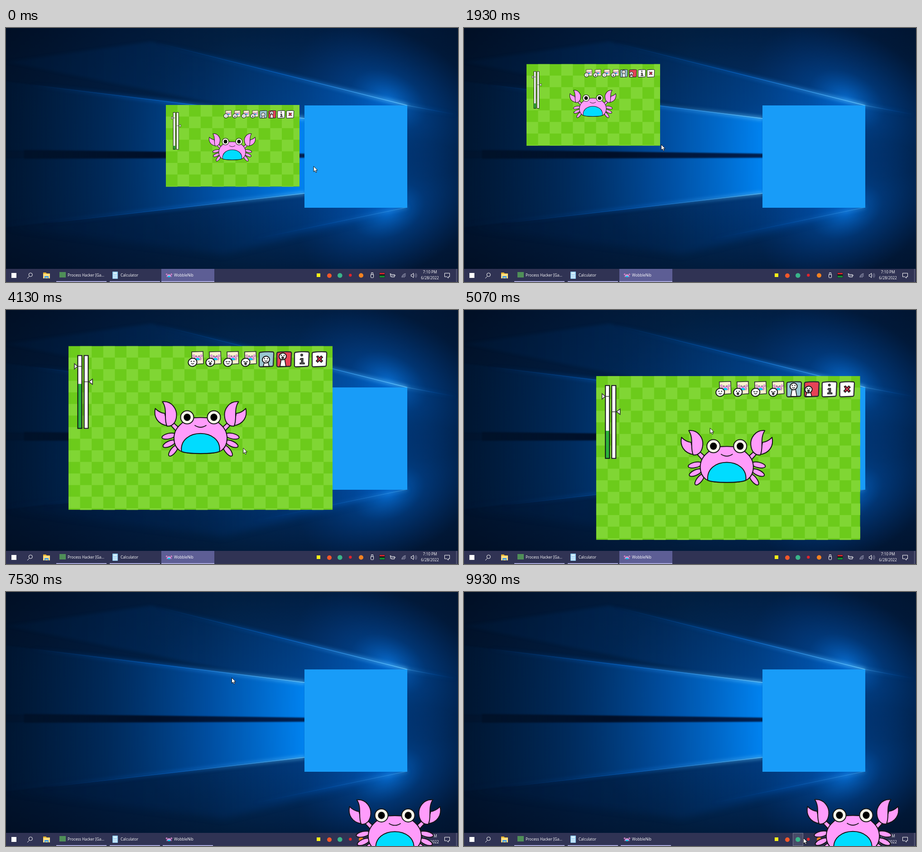
Animation of 998 by 561 pixels, one loop 10 s. Source, as an HTML page with a canvas:

```html
<!DOCTYPE html>
<html lang="en">
<head>
<meta charset="utf-8">
<title>Desktop crab</title>
<style>
html, body { margin: 0; width: 100%; height: 100%; overflow: hidden; background: #011025; }
canvas, svg, .bar { position: absolute; left: 0; top: 0; }
.bar { top: 532px; width: 998px; height: 29px; background: #303354; }
.bar span { position: absolute; top: 8px; font: 8.3px/12px "Open Sans", "Noto Sans", sans-serif; color: #fff; white-space: nowrap; }
.bar .clock { left: 911px; width: 50px; text-align: center; }
.task { position: absolute; top: 0; height: 29px; box-sizing: border-box; border-bottom: 2px solid #aaa9dc; }
.task.on { background: #5d5e95; left: 343px !important; width: 117px !important; }
#hover { position: absolute; left: 726px; top: 0; width: 21px; height: 27px; border: 1px solid #777990; background: #474a68; }
</style>
</head>
<body>
<canvas id="wall" width="998" height="561"></canvas>
<div class="bar">
  <div class="task" style="left:111px;width:111px"></div>
  <div class="task" style="left:229px;width:111px"></div>
  <div class="task" id="app" style="left:346px;width:111px"></div>
  <div id="hover"></div>
  <span style="left:136px">Process Hacker [Ga...</span>
  <span style="left:253px">Calculator</span>
  <span style="left:371px">WobbleNib</span>
  <span class="clock" style="top:1px">7:10 PM</span>
  <span class="clock" style="top:14px">6/28/2022</span>
</div>
<svg width="998" height="561" fill="none" stroke="#fff">
  <rect x="12" y="541" width="11" height="11" fill="#fff" stroke="none"/>
  <path d="M51.5 548.5L47 553"/><circle cx="54.3" cy="545" r="4"/>
  <g stroke="none">
    <path d="M82 540h6l2 2h7v11H82z" fill="#e9b52e"/><path d="M82 543h15v10H82z" fill="#ffdf80"/>
    <path d="M85 553v-5h9v5h-2v-2h-5v2z" fill="#3d9be8"/>
    <rect x="118" y="539" width="14" height="12" fill="#4f8f58"/>
    <rect x="235" y="538" width="12" height="16" rx="1" fill="#8ecbf2"/>
    <path d="M237 540h8v3h-8z" fill="#e8f6ff"/>
    <path d="M237 545.5h8m-8 3h8m-8 3h8" stroke="#fff" stroke-width="1.8" stroke-dasharray="2 1"/>
    <rect x="686" y="542" width="8" height="8" fill="#f7f019"/>
    <circle cx="714" cy="547" r="5" fill="#f4582a"/>
    <circle cx="737.3" cy="546.5" r="5.3" fill="#39b58a"/>
    <circle cx="760.3" cy="546" r="3.2" fill="#e3232c"/>
    <circle cx="784" cy="546.5" r="5" fill="#f58220"/>
    <path d="M824.5 540.5h12v11h-12z" fill="#171717"/>
    <path d="M825 541h11v3h-11z" fill="#d62431"/><path d="M825 547h11v4h-11z" fill="#118a35"/>
  </g>
  <path d="M805.5 544.5h6v6q0 1-1 1h-4q-1 0-1-1zm1.300 0v-4h3.500v4M849 542.500v7m0-5h8.500v5.500h-6.500v-3.500m8-1.500v3M847.500 543h3M853 547h3"/>
  <path d="M874 551a9 9 0 0 1 8.500-8.500M876.500 551a6 6 0 0 1 6-6M879 551a4 4 0 0 1 3.500-3.500" stroke="#c6c8dc"/>
  <path d="M894.500 544.500h2l3-3v10l-3-3h-2z"/><path d="M901 544.500q2 2 0 4m2-6q3 4 0 8m2-9q4 5 0 10" stroke="#a6a8bf" stroke-width=".8"/>
  <path d="M968.500 541.500h11v8h-3v3l-3-3h-5z"/>
  <path d="M994.500 532v29" stroke="#75778e"/>
</svg>
<canvas id="top" width="998" height="561"></canvas>
<script>
const LOOP = 10000, FULL = 583, INK = '#141414', PINK = '#ff9cfb', AQUA = '#00dcff';
const wall = document.getElementById('wall').getContext('2d');
const g = document.getElementById('top').getContext('2d');
const app = document.getElementById('app'), hover = document.getElementById('hover');

// time, x, y, width
const PANEL = [
  [0, 353, 170, 295], [480, 353, 170, 295], [1070, 153, 89, 295], [1200, 138, 79.5, 295],
  [3000, 138, 79.5, 295], [3730, 138, 79.5, FULL], [4430, 138, 79.5, FULL],
  [5070, 291, 145.5, FULL], [5330, 486, 206, FULL], [5700, 568, 338, FULL]
];
const POINTER = [
  [0, 679, 305], [420, 553, 260], [480, 553, 260], [1070, 353, 179], [1200, 338, 169],
  [1300, 338, 169], [1800, 435, 257], [3000, 435, 257], [3730, 744, 427], [3870, 744, 427],
  [4130, 524, 305], [4330, 389, 194], [4430, 389, 194], [5070, 542, 260], [5330, 737, 321],
  [5700, 819, 453], [6130, 600, 295], [6530, 600, 295], [7000, 498, 189], [8700, 498, 189],
  [9600, 714, 540], [9730, 714, 540], [9930, 749, 543]
];
const SWAY = [
  [0, -2, 5], [1000, 1, -3], [1930, -2, -6], [3000, 0, 2], [4130, 0, 0], [5070, -3, -2.5],
  [6130, 0, 1.5], [7000, -1, -2], [9930, -1, -2.5]
];
const LEVEL = [
  [0, .1], [700, .2], [1300, .08], [1930, .14], [2500, .3], [3300, .15], [4130, .61],
  [4600, .3], [5070, .38], [5600, .5], [6130, .69], [7300, .4]
];

function at(track, t) {
  const i = track.findIndex(k => k[0] > t);
  if (i < 0) return track[track.length - 1].slice(1);
  const a = track[i - 1], b = track[i], f = (t - a[0]) / (b[0] - a[0]);
  return a.slice(1).map((v, j) => v + (b[j + 1] - v) * f);
}

function shape(c, d, fill, line = 2, ink = INK) {
  const p = new Path2D(d);
  if (fill) { c.fillStyle = fill; c.fill(p); }
  if (line) { c.strokeStyle = ink; c.lineWidth = line; c.stroke(p); }
}

function oval(c, x, y, rx, ry, fill, line = 2, turn = 0) {
  c.beginPath();
  c.ellipse(x, y, rx, ry, turn, 0, 7);
  c.fillStyle = fill;
  c.fill();
  if (line) { c.lineWidth = line; c.strokeStyle = INK; c.stroke(); }
}

function placed(c, x, y, s, draw) {
  c.save();
  c.translate(x, y);
  c.scale(s, s);
  draw(c);
  c.restore();
}

function limbs(c) {
  oval(c, -70, 18, 15.5, 6, PINK, 2, -.22);
  oval(c, -69, 35, 15, 6, PINK, 2, -.42);
  oval(c, -60, 50, 15, 6, PINK, 2, -.9);
  shape(c, 'M-66 -6L-54 7L-46 1L-59 -11Z', PINK);
  shape(c, 'M-100 -43Q-90 -33 -79 -32L-73 -5C-95 -8 -104 -25 -100 -43Z', PINK);
  shape(c, 'M-84 -58C-62 -60 -52 -40 -53 -27C-54 -12 -62 -3 -74 -4C-82 -20 -72 -40 -84 -58Z', PINK);
}

function crab(c, open) {
  c.lineJoin = 'round';
  limbs(c);
  c.save(); c.scale(-1, 1); limbs(c); c.restore();
  shape(c, 'M-46 50C-62 38 -64 10 -45 -7C-30 -22 -15 -23 0 -23C15 -23 30 -22 45 -7C64 10 62 38 46 50C30 59 -30 59 -46 50Z', PINK);
  shape(c, 'M-42 52C-48 -1 48 -1 42 52C28 58 -28 58 -42 52Z', AQUA);
  for (const x of [-29.5, 29.5]) {
    oval(c, x, -23.5, 14.5, 14.5, '#f8f5e9');
    oval(c, x, -23.5, 7.6, 8, '#000', 0);
  }
  if (open) shape(c, 'M-13 -6Q-7 -12 0 -10Q7 -12 13 -6Q0 3 -13 -6Z', '#000', 1);
  else shape(c, 'M-13 -6Q0 3 13 -6', null, 1.8);
}

function face(c, x, y, r, awake, open) {
  oval(c, x, y, r, r * .92, '#fff', 2, -.3);
  for (const d of [-3, 3]) {
    if (awake) oval(c, x + d, y - 2, 1.1, 1.4, INK, 0);
    else shape(c, `M${x + d - 2} ${y - 2}q2 2 4 0`, null, 1.4);
  }
  if (open) oval(c, x, y + 3, 2, 2.4, '#555', 1.4);
  else shape(c, `M${x - 3} ${y + 2}q3 3.500 6 0`, null, 1.4);
}

const BOX = 'M3 2Q17 0 31 1Q34 1 33 8L32 30Q32 33 28 33L4 34Q0 34 1 28L1 6Q1 2 3 2Z';

function button(c, k, raised) {
  const edge = '#26262e';
  if (k < 4) {
    shape(c, 'M8 1L33 0L34 27L9 29Z', '#faf1cf', 1.5, edge);
    placed(c, 21, 13, .11, c => crab(c, k % 2));
    face(c, 10, 24, 9.7, k < 2, k % 2);
    return;
  }
  shape(c, BOX, ['#9ac7d0', '#e64357', '#fff', '#fff'][k - 4], 2.3, edge);
  if (k === 6) {
    shape(c, 'M15 15h5v10h3v3h-10v-3h3v-7h-3z', '#555', 1.2);
    oval(c, 17, 8, 2.3, 2.3, '#555', 1.2);
  } else if (k === 7) {
    shape(c, 'M11 11l3-1 3 4 4-4 3 3-4 4 4 4-3 3-4-4-4 4-3-3 4-4z', '#d9304d', 1.8);
  } else {
    const up = k === 4 ? raised : !raised, y = up ? 11 : 18, x = k === 5 ? (up ? 14 : 10) : 16;
    shape(c, `M${x - 3} ${y + 4}L${x - 6} 33H${x + 7}L${x + 4} ${y + 4}Z`, '#fff', 1.7);
    face(c, x, y, 8, true, k === 5);
  }
}

function meters(c, level) {
  c.lineJoin = 'miter';
  [8, 22].forEach((x, i) => {
    c.fillStyle = '#fff';
    c.fillRect(x, 8, 10, 163);
    if (!i) {
      c.fillStyle = '#2cb43c';
      c.fillRect(x, 8 + 163 * (1 - level), 10, 163 * level);
    }
    c.strokeStyle = '#111';
    c.lineWidth = 2;
    c.strokeRect(x + .5, 9, 9, 161);
  });
  shape(c, 'M9 33H17M23 67H31', null, 1.5, '#444');
  shape(c, 'M1 27L8 33L1 39ZM41 61L33 67L41 73Z', '#fff', 1.6, '#333');
}

function panel(x, y, w, h, s, t) {
  g.save();
  g.beginPath();
  g.rect(x, y, w, h);
  g.clip();
  g.fillStyle = '#6ccb1b';
  g.fillRect(x, y, w, h);
  g.fillStyle = '#80d634';
  const cell = 25.6;
  for (let r = 0; r * cell < h; r++)
    for (let k = (r + 1) % 2; k * cell < w; k += 2)
      g.fillRect(x + k * cell, y + r * cell, cell, cell);
  placed(g, x + 12, y + 12, s, c => meters(c, at(LEVEL, t)[0]));
  const raised = Math.floor(t / 200) % 2 === 1;
  for (let k = 0; k < 8; k++)
    placed(g, x + w - 12 - s * (34 + (7 - k) * 39), y + 12, s, c => button(c, k, raised));
  g.restore();
}

function frame(now) {
  const t = now % LOOP, shown = t < 7270, talking = t > 7600 && t < 9600;
  const [x, y, w] = at(PANEL, t), h = 180.5 + (w - 295) * 181.5 / 288, s = w / FULL;
  let [dx, dy] = at(SWAY, t);
  if (talking) {
    dx = -1 - 11.5 * Math.cos((t - 8670) * 2 * Math.PI / 310);
    dy = -2 + 13 * Math.cos((t - 8670) * 2 * Math.PI / 230);
  }
  g.clearRect(0, 0, 998, 561);
  if (shown) panel(x, y, w, h, s, t);
  placed(g, x + w / 2 + dx * s, y + h / 2 + dy * s, s, c => crab(c, talking));
  const [px, py] = at(POINTER, t);
  placed(g, px, py, 1, c => shape(c, 'M.5 .5V12.500L3.300 10L5.300 14.300L7.300 13.400L5.400 9.200H9.200Z', '#fff', .9, '#000'));
  app.classList.toggle('on', shown);
  hover.style.visibility = t >= 9800 ? 'visible' : 'hidden';
  requestAnimationFrame(frame);
}

function ramp(x0, y0, x1, y1, ...stops) {
  const r = wall.createLinearGradient(x0, y0, x1, y1);
  stops.forEach((c, i) => r.addColorStop(i / (stops.length - 1), c));
  return r;
}

function glow(x, y, r, a, sx = 1, turn = 0) {
  wall.save();
  wall.translate(x, y);
  wall.rotate(turn);
  wall.scale(sx, 1);
  const f = wall.createRadialGradient(0, 0, 0, 0, 0, r);
  f.addColorStop(0, `rgba(10,130,245,${a})`);
  f.addColorStop(.4, `rgba(0,95,200,${a * .4})`);
  f.addColorStop(1, 'rgba(0,70,160,0)');
  wall.fillStyle = f;
  wall.fillRect(-r, -r, 2 * r, 2 * r);
  wall.restore();
}

function beam(d, x0, blur, ...colors) {
  wall.filter = `blur(${blur}px)`;
  shape(wall, d, ramp(x0, 0, 886, 0, ...colors), 0);
  wall.filter = 'none';
}

function ray(x0, y0, x1, y1, a) {
  const ink = ramp(x0, y0, x1, y1, 'rgba(0,90,190,0)', `rgba(10,120,235,${a * .6})`, `rgba(110,205,255,${a})`);
  for (const [width, blur] of [[5, 4], [1.5, .7]]) {
    wall.filter = `blur(${blur}px)`;
    shape(wall, `M${x0} ${y0}L${x1} ${y1}`, null, width, ink);
  }
  wall.filter = 'none';
}

function paintWall() {
  wall.fillStyle = ramp(0, 0, 998, 0, '#011127', '#011d40', '#02274f', '#022550', '#011a3a');
  wall.fillRect(0, 0, 998, 561);
  wall.fillStyle = ramp(0, 0, 0, 561, 'rgba(0,10,30,.3)', 'rgba(0,40,90,.1)', 'rgba(0,8,25,.45)');
  wall.fillRect(0, 0, 998, 561);
  glow(700, 275, 290, .5, 1.5);
  glow(845, 160, 150, .75, 1.5, .5);
  glow(845, 405, 140, .75, 1.5, -.45);
  beam('M320 30L886 171L660 205L0 75Z', 0, 3, 'rgba(0,45,95,.12)', 'rgba(0,70,150,.25)', 'rgba(0,110,220,.6)');
  beam('M0 440L660 365L886 397L480 500Z', 0, 8, 'rgba(0,40,90,.1)', 'rgba(0,55,125,.2)', 'rgba(0,100,210,.5)');
  const blues = ['rgba(0,36,76,.15)', 'rgba(0,52,110,.55)', 'rgba(0,86,176,.8)', '#0084f2', '#0098ff'];
  beam('M0 118L660 200V278L0 270Z', 0, 1.5, ...blues);
  beam('M0 288L660 286V365L0 440Z', 0, 1.5, ...blues);
  beam('M40 269L660 278V286L40 289Z', 40, 1.5, 'rgba(0,12,30,.4)', 'rgba(0,14,38,.95)', '#011c48', '#01316d');
  ray(50, 125, 660, 200, .9);
  ray(80, 432, 660, 365, .75);
  ray(330, 32, 886, 171, .85);
  ray(540, 468, 886, 396, .3);
  ray(998, 192, 886, 171, .3);
  wall.fillStyle = '#189cf8';
  wall.fillRect(659, 171, 227, 226);
  placed(wall, 359.5, 546, .075, c => crab(c, false));
}

paintWall();
// the small task icon sits above the bar
const mini = document.createElement('canvas');
mini.width = 20;
mini.height = 16;
mini.style.cssText = 'left:349.5px;top:6px';
placed(mini.getContext('2d'), 10, 8, .075, c => crab(c, false));
document.querySelector('.bar').append(mini);
requestAnimationFrame(frame);
</script>
</body>
</html>
```
